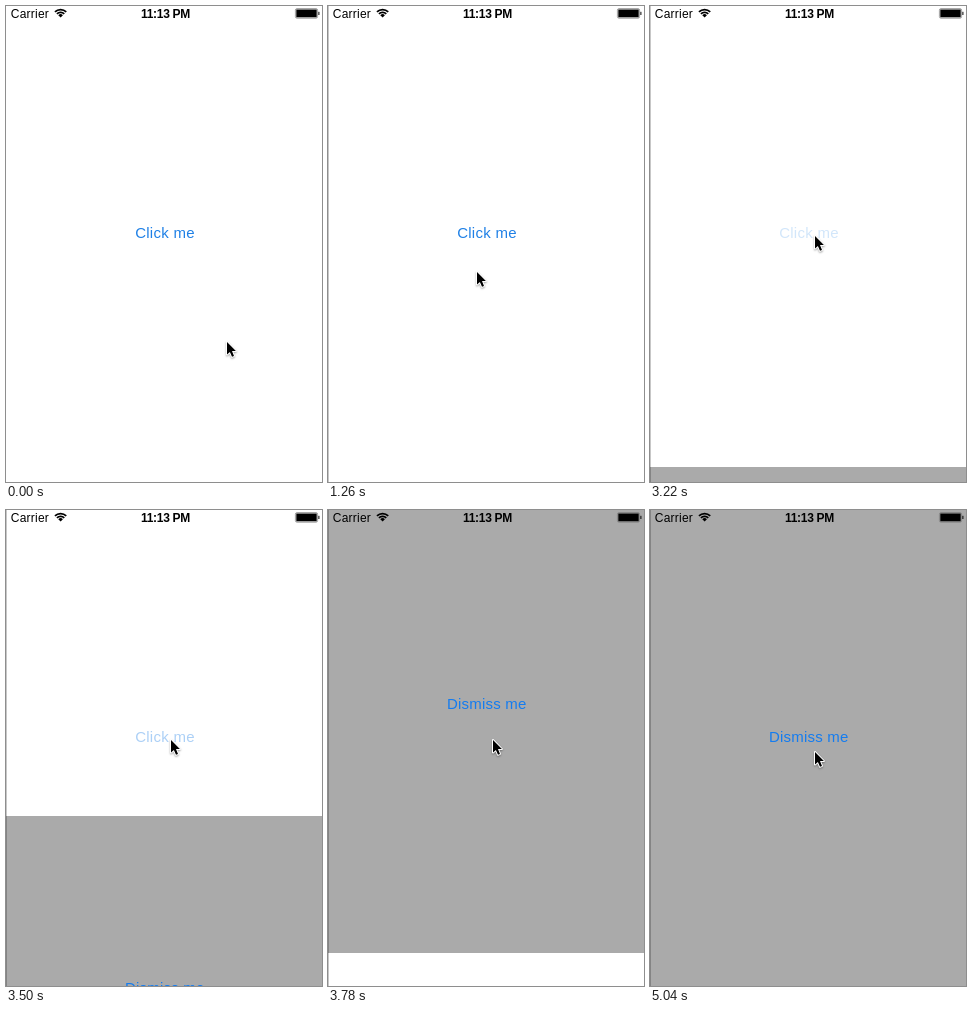
Write an HTML page with a canvas that moves like this. It is 316 by 476 pixels and loops after 5.18 s.

```html
<!DOCTYPE html>
<html lang="en">
<head>
<meta charset="utf-8">
<title>Modal spring</title>
<style>
html, body { margin: 0; width: 100%; height: 100%; overflow: hidden; background: #fff; }
canvas { display: block; width: 316px; height: 476px; }
</style>
</head>
<body>
<canvas id="stage"></canvas>
<script>
const W = 316, H = 476, LOOP = 5180, STEP = 140;
const FONT = '"Liberation Sans", Arial, sans-serif';
const CLICK_BLUE = '#1f80e6', DISMISS_BLUE = '#147cf0';

const canvas = document.getElementById('stage');
const ctx = canvas.getContext('2d');
const dpr = window.devicePixelRatio || 1;
canvas.width = W * dpr;
canvas.height = H * dpr;

// Each key is [time, ...values]; values between keys are linear.
const cursorKeys = [
  [0, 221, 336], [280, 210, 323], [420, 210, 323], [840, 150, 266],
  [980, 150, 266], [1260, 149, 266], [1540, 152, 261], [2100, 172, 235],
  [2520, 165, 230], [4760, 165, 230], [5040, 165, 242]
];
const sheetKeys = [[3080, H], [3220, 461], [3360, 404], [3500, 306]];
const labelKeys = [[3220, 640], [3360, 580], [3500, 478]];
const fadeKeys = [[3220, 0.2], [3500, 0.37], [3920, 1]];

function sample(keys, t) {
  const next = keys.findIndex(k => k[0] > t);
  if (next === 0) return keys[0].slice(1);
  if (next < 0) return keys[keys.length - 1].slice(1);
  const a = keys[next - 1], b = keys[next];
  const p = (t - a[0]) / (b[0] - a[0]);
  return a.slice(1).map((v, i) => v + (b[i + 1] - v) * p);
}

// Remaining distance of a damped spring, from 1 towards 0.
function spring(x) {
  const zeta = 0.6, beta = 0.8;
  return Math.exp(-zeta * x) * (Math.cos(beta * x) + zeta / beta * Math.sin(beta * x));
}

function sheetTop(t) {
  if (t <= 3500) return sample(sheetKeys, t)[0];
  if (t >= 4200) return 0;
  return Math.round(H * spring(1.07 + (t - 3500) / STEP * 1.1));
}

function text(str, x, y, size, color, spacing, weight = 400) {
  ctx.font = `${weight} ${size}px ${FONT}`;
  ctx.letterSpacing = `${spacing}px`;
  ctx.fillStyle = color;
  ctx.fillText(str, x, y);
}

function drawWifi(x, y) {
  const from = -Math.PI * 0.75, to = -Math.PI * 0.25;
  ctx.strokeStyle = '#000';
  ctx.lineWidth = 1.7;
  for (const r of [8, 5.2]) {
    ctx.beginPath();
    ctx.arc(x, y, r, from, to);
    ctx.stroke();
  }
  ctx.fillStyle = '#000';
  ctx.beginPath();
  ctx.moveTo(x, y);
  ctx.arc(x, y, 3.3, from, to);
  ctx.fill();
}

function drawBattery() {
  ctx.strokeStyle = '#777';
  ctx.lineWidth = 0.7;
  ctx.beginPath();
  ctx.roundRect(289.4, 2.6, 22.2, 9.6, 1.6);
  ctx.stroke();
  ctx.fillStyle = '#000';
  ctx.fillRect(290.3, 3.5, 20.4, 7.8);
  ctx.fillRect(312.4, 5.8, 1, 3.2);
}

function drawStatus() {
  ctx.textAlign = 'left';
  text('Carrier', 4.8, 12, 12, '#000', 0.22);
  ctx.textAlign = 'center';
  text('11:13 PM', 159.5, 12, 12, '#000', -0.28, 700);
  drawWifi(54.6, 11.6);
  drawBattery();
}

function drawCursor(x, y) {
  ctx.save();
  ctx.translate(x, y);
  const arrow = new Path2D('M0 0V12.6L2.9 9.9L5 14.8L7 13.9L5 9.1H8.9Z');
  ctx.lineJoin = 'round';
  ctx.lineWidth = 2;
  ctx.strokeStyle = '#fff';
  ctx.shadowColor = 'rgba(0,0,0,0.35)';
  ctx.shadowBlur = 2 * dpr;
  ctx.shadowOffsetY = dpr;
  ctx.stroke(arrow);
  ctx.shadowColor = 'transparent';
  ctx.fillStyle = '#000';
  ctx.fill(arrow);
  ctx.restore();
}

function draw(t) {
  ctx.setTransform(dpr, 0, 0, dpr, 0, 0);
  ctx.textAlign = 'center';
  ctx.fillStyle = '#fff';
  ctx.fillRect(0, 0, W, H);

  ctx.globalAlpha = t < 2940 ? 1 : sample(fadeKeys, t)[0];
  text('Click me', 159, 232, 15, CLICK_BLUE, 0.28);
  ctx.globalAlpha = 1;

  const top = sheetTop(t);
  if (top < H) {
    ctx.fillStyle = '#aaa';
    ctx.fillRect(0, top, W, H);
    const labelY = t <= 3500 ? sample(labelKeys, t)[0] : 227 + top;
    text('Dismiss me', 158.8, labelY + 5, 15, DISMISS_BLUE, 0.2);
  }

  if (t >= 1120) {
    ctx.fillStyle = 'rgba(0,0,0,0.22)';
    ctx.fillRect(0, 0, 1, H);
  }
  drawStatus();
  drawCursor(...sample(cursorKeys, t).map(Math.round));
}

function tick() {
  const t = performance.now() % LOOP;
  draw(Math.floor(t / STEP) * STEP);
  requestAnimationFrame(tick);
}
tick();
</script>
</body>
</html>
```
